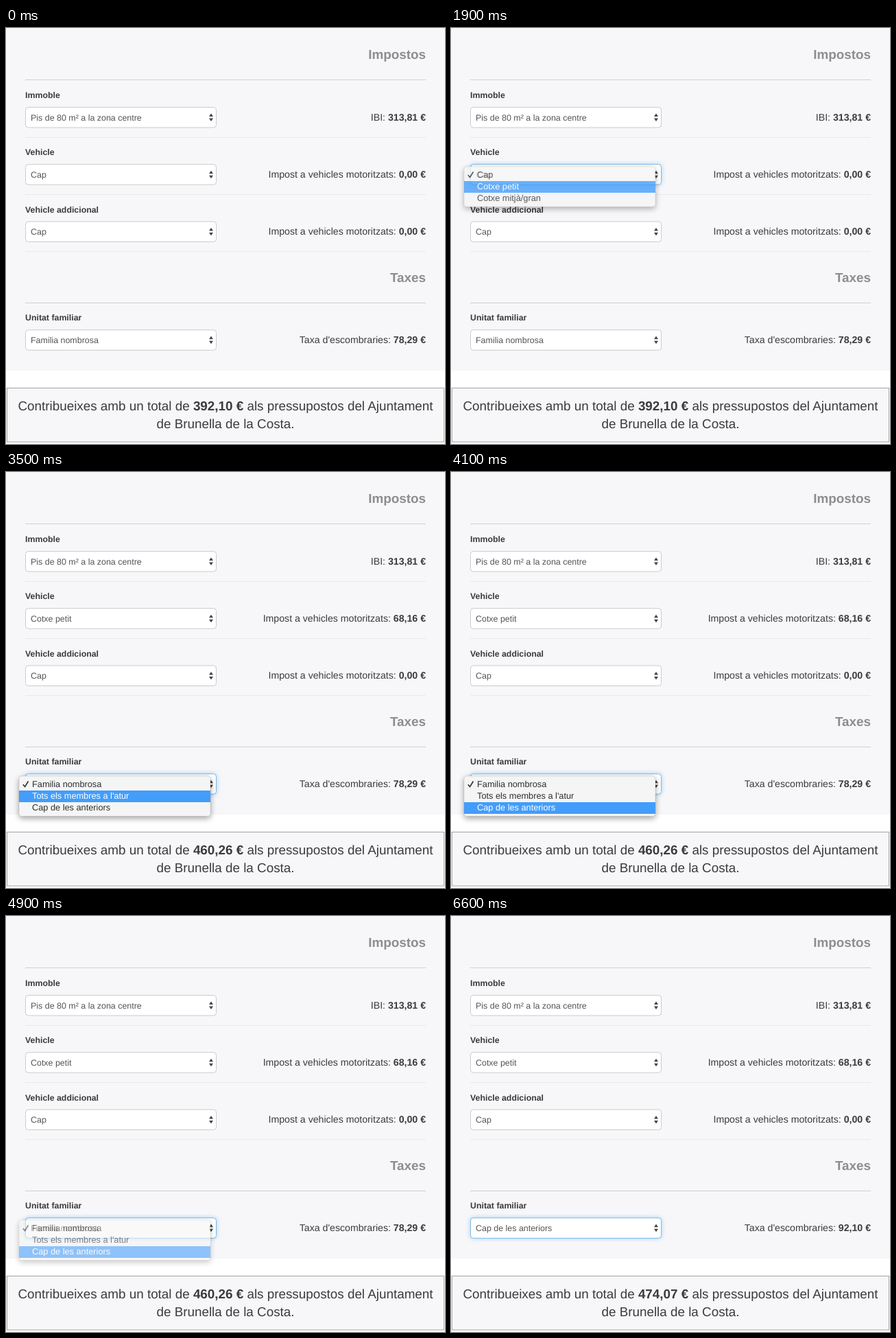
Write an HTML page with a canvas that moves like this. It is 640 px wide and 606 px high and loops after 6700 ms.

```html
<!DOCTYPE html>
<html lang="ca">
<head>
<meta charset="utf-8">
<title>Impostos i taxes</title>
<style>
html, body { margin: 0; width: 100%; height: 100%; overflow: hidden; background: #fff; }
canvas { display: block; }
</style>
</head>
<body>
<canvas id="stage" width="640" height="606"></canvas>
<script>
const W = 640, H = 606, LOOP = 6700, STEP = 100;
const LEFT = 28, RIGHT = 612;
const FONT = '"Liberation Sans", Arial, sans-serif';
const PANEL = '#f7f7f9', INK = '#3b3b3d';

const stage = document.getElementById('stage').getContext('2d');
const layer = document.createElement('canvas');
layer.width = W;
layer.height = H;
const overlay = layer.getContext('2d');

const CARS = ['Cap', 'Cotxe petit', 'Cotxe mitjà/gran'];
const FAMILIES = ['Familia nombrosa', "Tots els membres a l'atur", 'Cap de les anteriors'];

// Opening, hover, closing and focus times of the two menus
const CAR_MENU = { y: 213.5, items: CARS, open: 800, hovers: [[800, 0], [1000, 1]], fade: 1800, end: 2200 };
const FAMILY_MENU = { y: 454.5, items: FAMILIES, open: 2700, hovers: [[2700, 0], [3200, 1], [3900, 2]], fade: 4700, end: 5100 };

const euros = n => n.toFixed(2).replace('.', ',') + ' €';

function text(c, str, x, y, size, color, weight = 'normal') {
  c.font = `${weight} ${size}px ${FONT}`;
  c.textRendering = 'geometricPrecision';
  c.fillStyle = color;
  c.fillText(str, x, y);
  return x + c.measureText(str).width;
}

function widthOf(c, str, size, weight = 'normal') {
  c.font = `${weight} ${size}px ${FONT}`;
  c.textRendering = 'geometricPrecision';
  return c.measureText(str).width;
}

// Each run is [string, weight]; align is 0 for left, 0.5 centre, 1 right
function runs(c, parts, x, y, size, color, align) {
  const total = parts.reduce((sum, [s, w]) => sum + widthOf(c, s, size, w), 0);
  let pen = x - total * align;
  for (const [s, w] of parts) pen = text(c, s, pen, y, size, color, w);
}

function rule(y, color) {
  stage.fillStyle = color;
  stage.fillRect(LEFT, y, RIGHT - LEFT, 1);
}

function heading(str, y) {
  runs(stage, [[str, 'bold']], RIGHT, y, 18.85, '#8d8d8f', 1);
}

function triangle(x, y, dy) {
  stage.beginPath();
  stage.moveTo(x - 3, y);
  stage.lineTo(x + 3, y);
  stage.lineTo(x, y + dy);
  stage.fill();
}

function select(y, value, focused) {
  stage.save();
  stage.beginPath();
  stage.roundRect(28.5, y - 14.5, 278, 29.5, 4);
  stage.fillStyle = '#fff';
  if (focused) {
    stage.shadowColor = 'rgba(102,175,233,.6)';
    stage.shadowBlur = 7;
  }
  stage.fill();
  stage.shadowColor = 'transparent';
  stage.strokeStyle = focused ? '#7db9e8' : '#cbcbcd';
  stage.lineWidth = 1;
  stage.stroke();
  stage.restore();
  text(stage, value, 36, y + 4.7, 12.45, '#555557');
  stage.fillStyle = '#444';
  triangle(299, y - 1, -4.5);
  triangle(299, y + 1.5, 4.5);
}

function row(y, label, value, focused, tax, amount) {
  text(stage, label, LEFT, y - 28, 12.35, INK, 'bold');
  select(y, value, focused);
  runs(stage, [[tax + ': ', 'normal'], [euros(amount), 'bold']], RIGHT, y + 4.8, 14.15, INK, 1);
}

function menu({ y, items, open, hovers, fade, end }, t) {
  if (t < open || t >= end) return;
  const hover = hovers.filter(([at]) => t >= at).pop()[1];
  const top = y - 11.5, c = overlay;
  c.clearRect(0, 0, W, H);
  c.save();
  c.beginPath();
  c.roundRect(19, top, 279, 58.5, 4);
  c.shadowColor = 'rgba(0,0,0,.38)';
  c.shadowBlur = 9;
  c.shadowOffsetY = 3;
  c.fillStyle = '#f5f5f5';
  c.fill();
  c.shadowColor = 'transparent';
  c.strokeStyle = 'rgba(0,0,0,.16)';
  c.lineWidth = 0.6;
  c.stroke();
  c.restore();

  c.fillStyle = '#439dfb';
  c.fillRect(19, Math.round(y - 8) + hover * 17, 279, 17);
  items.forEach((item, i) => {
    text(c, item, 38, y + 4.5 + i * 17, 12.75, i === hover ? '#fff' : '#2e2e2e');
  });

  c.strokeStyle = hover === 0 ? '#fff' : '#2e2e2e';
  c.lineWidth = 1.6;
  c.beginPath();
  c.moveTo(24.8, y + 0.8);
  c.lineTo(27.6, y + 4);
  c.lineTo(32.5, y - 4);
  c.stroke();

  stage.globalAlpha = t < fade ? 1 : 1 - (t - fade) / (end - fade) * 0.85;
  stage.drawImage(layer, 0, 0);
  stage.globalAlpha = 1;
}

function draw(t) {
  const carChosen = t >= CAR_MENU.end, familyChosen = t >= FAMILY_MENU.end;
  const house = 313.81, car = carChosen ? 68.16 : 0, waste = familyChosen ? 92.10 : 78.29;
  const carFocus = t >= CAR_MENU.open && t < FAMILY_MENU.open;
  const vehicleTax = 'Impost a vehicles motoritzats';

  stage.fillStyle = '#fff';
  stage.fillRect(0, 0, W, H);
  stage.fillStyle = PANEL;
  stage.fillRect(0, 0, W, 499);

  heading('Impostos', 45);
  rule(75, '#cfcfd1');
  row(130, 'Immoble', 'Pis de 80 m² a la zona centre', false, 'IBI', house);
  rule(159, '#e9e9eb');
  row(213.2, 'Vehicle', CARS[+carChosen], carFocus, vehicleTax, car);
  rule(242, '#e9e9eb');
  row(296.5, 'Vehicle addicional', CARS[0], false, vehicleTax, 0);
  rule(325, '#e9e9eb');
  heading('Taxes', 369.5);
  rule(400, '#cfcfd1');
  row(454.3, 'Unitat familiar', FAMILIES[familyChosen ? 2 : 0], t >= FAMILY_MENU.open,
    "Taxa d'escombraries", waste);

  stage.fillStyle = PANEL;
  stage.fillRect(1, 524, 638, 79);
  stage.strokeStyle = '#a3a3a5';
  stage.lineWidth = 1;
  stage.strokeRect(1.5, 524.5, 637, 78.5);
  runs(stage, [
    ['Contribueixes amb un total de ', 'normal'],
    [euros(house + car + waste), 'bold'],
    [' als pressupostos del Ajuntament', 'normal']
  ], 320, 557.3, 18.83, INK, 0.5);
  runs(stage, [['de Brunella de la Costa.', 'normal']], 320, 583, 18.83, INK, 0.5);

  menu(CAR_MENU, t);
  menu(FAMILY_MENU, t);
}

function tick() {
  const t = performance.now() % LOOP;
  draw(Math.floor(t / STEP) * STEP);
  requestAnimationFrame(tick);
}
tick();
</script>
</body>
</html>
```
